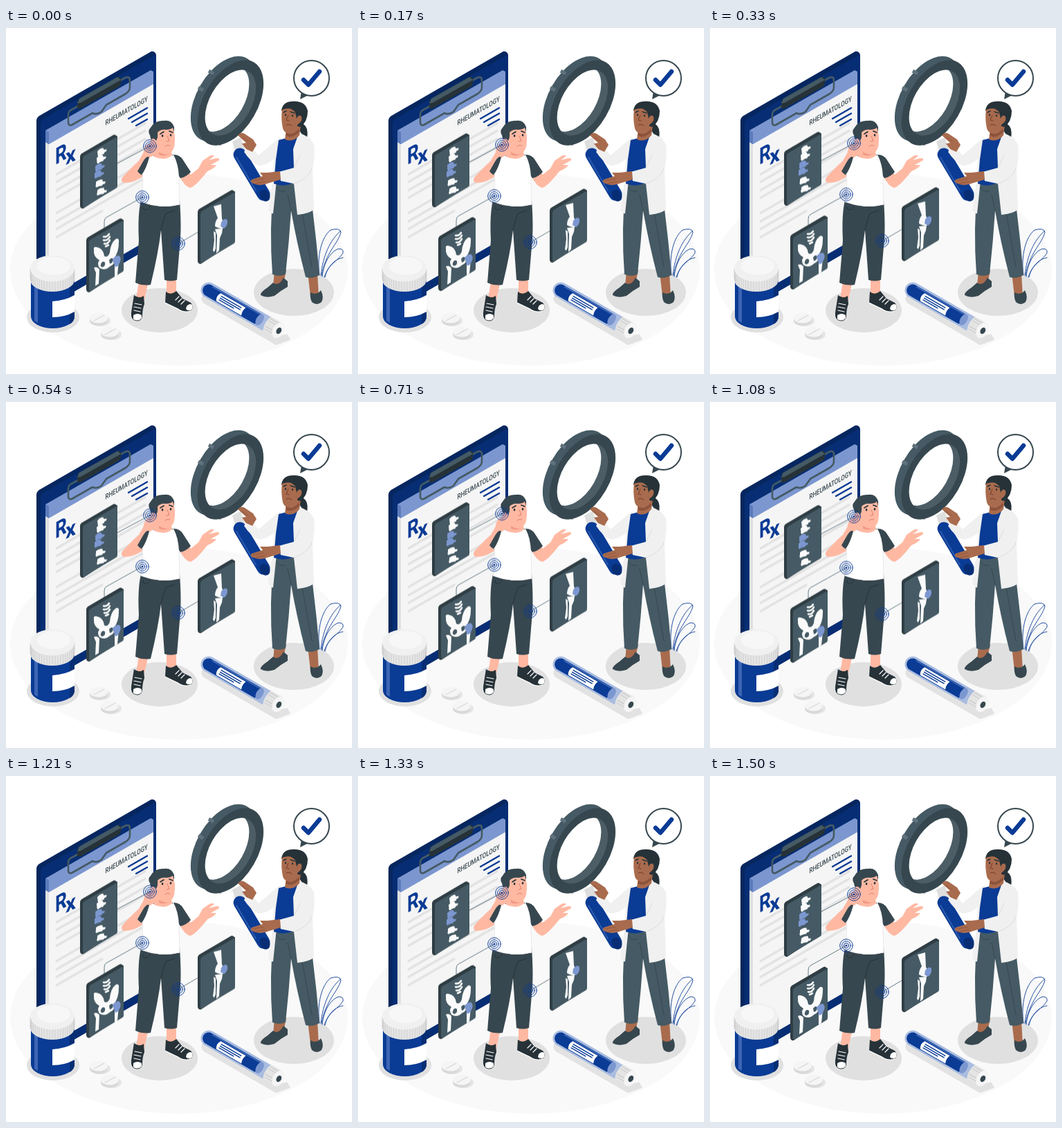
An HTML page for the animation above (1540 ms loop, 500 px wide and 500 px high).

```html
<!DOCTYPE html>
<html lang="en">
<head>
<meta charset="utf-8">
<title>Rheumatology</title>
<style>
  html, body { margin: 0; width: 100%; height: 100%; overflow: hidden; background: #fff; }
  svg { display: block; width: 100vw; height: 100vh; }
  .l { fill: none; stroke-linecap: round; stroke-linejoin: round; }
  .navy { fill: #0a3b95; } .board { fill: #072e74; } .deep { fill: #06265f; } .soft { fill: #7c97d0; }
  .slate { fill: #455a64; } .dark { fill: #37474f; } .ink { fill: #263238; }
  .skin { fill: #ffb9a3; } .tan { fill: #a96b4d; } .coat { fill: #f0f0f0; }
  text { font-family: Roboto, sans-serif; }
</style>
</head>
<body>
<svg viewBox="0 0 500 500">
  <defs>
    <g id="panel">
      <path fill="#2f3d44" d="M0 32Q0 30 2 28L48 1Q50 0 51 1L54 3V75L5 107Q3 108 1 106Q0 105 0 103Z"/>
      <path class="slate" d="M4 35Q4 33 6 31L51 5Q54 3 54 6V74Q54 77 52 78L7 105Q4 107 4 103Z"/>
    </g>
    <g id="target" class="l" stroke="#0b3a94">
      <circle r="9.3"/><circle r="6.3"/><circle r="3.6"/><circle r="1.6" fill="#0b3a94" stroke="none"/>
    </g>
    <path id="bone" d="M-5 -1Q-1 -5 4 -5L5 -2 9 -2 8 1 5 2 4 4Q0 4 -4 7Q-6 6 -5 3Z"/>
    <g id="pill">
      <ellipse cx="3" cy="4" rx="14" ry="8" fill="#e6e6e6"/>
      <path fill="#d9d9d9" d="M-13 0V4A13 7.500 0 0 0 13 4V0Z"/>
      <ellipse rx="13" ry="7.500" fill="#f5f5f5"/>
      <path class="l" stroke="#d0d0d0" d="M-7 4L8 -4"/>
    </g>
    <ellipse id="rim" rx="39" ry="67.500" transform="rotate(30)"/>
    <ellipse id="gap" rx="30" ry="52" transform="rotate(30)"/>
    <clipPath id="hole"><use href="#gap" x="324.400" y="108"/></clipPath>
  </defs>

  <ellipse cx="250" cy="349" rx="244" ry="139" fill="#f9f9f9"/>
  <ellipse cx="222" cy="408" rx="55" ry="32" fill="#e0e0e0"/>
  <ellipse cx="416" cy="382" rx="58" ry="34" fill="#e0e0e0"/>
  <ellipse cx="68" cy="418" rx="38" ry="22" fill="#e0e0e0"/>

  <!-- clipboard -->
  <path class="deep" d="M44 134Q44 130 48 127L208 35Q212 32 216 36L217 39V312L50 409Q44 411 44 404Z"/>
  <path class="board" d="M50 138Q50 134 54 131L213 40Q217 38 217 42V312L50 409Z"/>
  <path fill="#e0e0e0" d="M57 149L62 152V389L57 386Z"/>
  <path fill="#f5f5f5" d="M62 151L213 64V302L62 389Z"/>
  <path fill="#5c7bbd" d="M57 148L62 151V168L57 165Z"/>
  <path class="soft" d="M57 148L209 61 213 63V81L62 168V151Z"/>
  <g id="rows" class="l" stroke="#e3e3e3" stroke-width="3.600" style="stroke-linecap:butt"></g>
  <path class="l" stroke="#455a64" stroke-width="2.600" d="M104 113L93 119Q90 121 90 125V136Q90 143 97 139L125 123Q131 126 138 121L145 111 173 95Q179 91 179 86V76Q179 69 172 72L165 76"/>
  <path class="ink" d="M103 108Q103 104 106 102L161 71Q166 69 166 74V80Q166 83 163 85L108 116Q103 118 103 113Z"/>
  <path class="slate" d="M103 109L106 102 161 71 166 75 108 108Z"/>
  <text class="dark" font-weight="500" font-size="10.600" transform="matrix(.74 -.43 0 1 143.500 141)">RHEUMATOLOGY</text>
  <path class="l" stroke="#0b3a94" stroke-width="2.400" d="M177 131L204 115.500M182 136L204 123.500M188 141L204 132"/>
  <g class="navy" font-weight="700">
    <text font-size="33" transform="matrix(.8 -.46 0 1 71 198)">R</text>
    <text font-size="31" transform="matrix(.95 -.45 0 1 86 198)">x</text>
  </g>

  <!-- pill bottle and pills -->
  <path class="navy" d="M36 364H99V417A31.500 17 0 0 1 36 417Z"/>
  <path fill="#3c66b4" d="M41 372H46V426L41 423Z"/>
  <path class="board" d="M92 368H99V417Q99 424 92 428Z"/>
  <path fill="#fff" d="M67 395Q85 394 99 386V410Q85 418 67 418Z"/>
  <path fill="#e6e6e6" d="M35 347H99V364A32 17 0 0 1 35 364Z"/>
  <g id="ridges" class="l" stroke="#c9c9c9" stroke-width=".8"></g>
  <ellipse cx="67" cy="347.500" rx="32" ry="19" fill="#f0f0f0"/>
  <ellipse cx="69" cy="344" rx="24" ry="13" fill="#f7f7f7"/>
  <use href="#pill" x="134" y="419"/>
  <use href="#pill" x="150" y="439"/>

  <!-- vial, along its own axis -->
  <g transform="translate(293 379) rotate(30)">
    <path fill="#e2e2e2" d="M-3 7H120L130 -2 138 3 124 20H4Q-7 18 -3 7Z"/>
    <path fill="#a9bce0" d="M0 -11.500H100V11.500H0A11.500 11.500 0 0 1 0 -11.500Z"/>
    <path class="navy" d="M0 -8.500H82Q87 0 82 9H0A8.500 8.500 0 0 1 0 -8.500Z"/>
    <path fill="#3c66b4" d="M2 -8H84V-6H2Z"/>
    <ellipse cx="85" rx="5" ry="9" fill="#7c97d0"/>
    <path fill="#fff" d="M17 -5H59Q56 1 59 8H17Q13 1 17 -5Z"/>
    <path class="l" stroke="#0a3b95" stroke-width="1.400" d="M20 -1.500H53M20 1.500H53M20 4.500H44"/>
    <path fill="#e4e4e4" d="M97 -12H116V12H97Q92 0 97 -12Z"/>
    <path class="l" stroke="#c7c7c7" d="M98 -9H115M97 -5H115M97 4H115M98 8H115"/>
    <ellipse cx="116" rx="8" ry="12" fill="#f5f5f5"/>
    <ellipse cx="117" rx="3.500" ry="5" class="dark"/>
  </g>

  <!-- plant -->
  <g class="l" stroke="#2450a0">
    <path d="M453 357C449 330 456 302 469 292Q482 288 484 295C480 312 462 323 456 358M484 293C468 306 458 330 455 357"/>
    <path d="M457 359C459 338 470 322 481 319Q488 319 487 325C480 337 466 340 460 360"/>
    <path d="M461 360C464 345 476 333 487 332"/>
  </g>

  <!-- patient -->
  <path class="skin" d="M192 366H206L200 392H188ZM232 360H246V388H232Z"/>
  <path class="ink" d="M185 386Q192 392 199 387L200 399Q197 406 197 417Q195 425 187 423Q180 421 181 411Z"/>
  <path fill="#fff" d="M184 415Q190 411 196 415V419Q192 425 184 421Z"/>
  <path class="ink" d="M231 381Q238 387 246 380L255 391 267 397Q272 403 268 408Q258 413 248 405L230 397Z"/>
  <path fill="#fff" d="M261 402Q265 397 269 400Q271 405 267 408Q262 409 260 406Z"/>
  <path class="l" stroke="#fff" stroke-width="1.200" d="M186 398L196 400M185 403L195 405M185 408L194 410M245 393L250 388M249 396L254 391M253 399L258 394M230 397L248 406Q257 412 267 409"/>
  <path class="dark" d="M195 249H251Q254 290 251 316L247 364Q238 367 229 364L224 292Q220 326 209 371Q197 373 187 368L192 307Q190 270 195 249Z"/>
  <path class="l" stroke="#263238" d="M224 292Q227 278 231 268L243 264M197 258Q201 269 209 257"/>
  <path class="skin" d="M198 187Q185 197 168 216Q165 222 171 224Q187 224 204 210L208 190 217 184 214 171 204 172 197 183 186 202Z"/>
  <path class="dark" d="M214 184Q203 183 198 193L190 207Q195 214 203 214L218 190Z"/>
  <path class="skin" d="M251 215Q258 229 266 231Q274 229 291 207Q301 203 304 198L296 198 308 191Q309 188 304 188L293 191 301 185Q299 183 294 185L284 192 278 203 267 212 261 204Z"/>
  <path class="dark" d="M240 183Q251 182 256 191L267 208Q261 215 252 217L240 200Z"/>
  <path fill="#fff" d="M212 184Q227 193 242 183Q249 196 250 215L251 255Q224 262 195 251Q199 227 197 211Q203 202 207 187Z"/>
  <path class="l" stroke="#ebebeb" d="M250 216L251 255Q224 262 195 251Q199 227 197 211"/>
  <path class="skin" d="M212 166L214 186Q230 193 240 184L238 174Z"/>
  <path fill="#f29b86" d="M221 179Q230 185 238 178L238 181Q228 187 221 183Z"/>
  <path class="dark" d="M218 169Q209 164 208 155Q204 149 209 144Q215 133 228 134Q239 132 243 143L243 151 225 166Z"/>
  <path class="skin" d="M219 151Q224 146 231 147Q238 147 241 144Q246 156 243 172Q240 182 232 183Q222 181 217 173L213 171Q207 168 209 162Q213 157 217 163Q220 158 219 151Z"/>
  <path class="l" stroke="#263238" stroke-width="1.700" d="M223 153L228 150M236 149L241 151"/>
  <path class="ink" d="M226 154a1.300 1.800 0 1 0 .1 0ZM238 153a1.300 1.800 0 1 0 .1 0Z"/>
  <path class="l" stroke="#df7e6b" d="M233 156L236 163 232 164M230 171Q233 168 237 170"/>
  <path class="skin" d="M198 184Q199 171 206 167Q214 166 216 174Q216 184 208 187Z"/>

  <!-- magnifier: an extruded ring -->
  <use href="#rim" x="314.600" y="102.400" class="slate"/>
  <path class="slate" d="M329 41L339 46 310 170 300 165Z"/>
  <path class="l" stroke="#60737c" stroke-width="5" style="stroke-linecap:butt" d="M278 86L285 90M293 62L300 66"/>
  <use href="#rim" x="324.400" y="108" class="dark"/>
  <g clip-path="url(#hole)">
    <path fill="#4c5d66" d="M270 40H375V175H270Z"/>
    <use href="#gap" x="314.600" y="102.400" fill="#fff"/>
  </g>
  <path fill="#dedede" d="M327 164L339 158 346 176 332 181Z"/>
  <path class="l" stroke="#0a3b95" stroke-width="19" d="M338 183L372 240"/>
  <path class="l" stroke="#2d5bad" stroke-width="2" d="M333 187L361 235"/>
  <ellipse cx="374" cy="242" rx="7" ry="9" class="board" transform="rotate(-30 374 242)"/>

  <!-- doctor -->
  <path class="tan" d="M388 350H405L400 374H386ZM436 354H450L452 388H440Z"/>
  <path class="dark" d="M386 368Q394 374 401 361L407 366V374Q396 380 388 387Q376 391 368 386Q367 382 378 375ZM440 382Q449 387 455 379Q460 389 456 396Q449 402 442 396Q439 390 440 382Z"/>
  <path class="slate" d="M387 222H419L443 262Q449 310 453 357Q443 363 433 360Q420 310 412 264Q409 310 404 356Q394 360 385 356Q380 290 387 222Z"/>
  <path class="l" stroke="#37474f" d="M412 264L407 241M390 230Q394 238 403 236M427 262L442 345"/>
  <path class="ink" d="M426 137Q438 141 435 159Q429 157 424 148Z"/>
  <path class="coat" d="M396 158L387 165Q376 175 365 184L351 169 344 179Q354 194 365 199Q378 198 387 189L386 215 379 263Q383 269 386 268L391 220 399 160Z"/>
  <path class="navy" d="M394 162L421 155 419 222Q404 231 387 225L390 190Z"/>
  <path class="coat" d="M423 152Q438 155 445 168Q447 186 443 204L445 262Q439 268 421 270L416 225 397 221 394 208 416 202 415 175Z"/>
  <path class="l" stroke="#dcdcdc" d="M416 202L425 184M416 225Q436 219 442 203"/>
  <path class="tan" d="M405 145L403 161Q415 166 424 155L426 141Z"/>
  <path fill="#8c523b" d="M405 151Q413 157 423 146L424 150Q414 160 405 156Z"/>
  <path class="ink" d="M398 119Q400 106 415 106Q433 105 436 120Q436 136 425 143L414 140Z"/>
  <path class="tan" d="M399 118Q412 113 418 122L420 131Q423 124 427 128Q429 135 422 139Q417 149 409 152Q402 152 400 145Q397 130 399 118Z"/>
  <path class="l" stroke="#263238" stroke-width="1.500" d="M401 122L405 120M411 121L417 123"/>
  <path class="ink" d="M404 124a1.100 1.600 0 1 0 .1 0ZM414 125a1.100 1.600 0 1 0 .1 0Z"/>
  <path class="l" stroke="#753d2b" d="M408 126L405 133 409 134M405 140Q409 138 413 141"/>
  <path class="tan" d="M335 155Q340 149 345 153L357 161 362 169 356 179 347 175 341 167 347 166Z"/>
  <path class="tan" d="M396 207L378 209 367 209 371 214 355 219Q352 222 356 224Q366 230 380 224L397 219Z"/>
  <path class="l" stroke="#8c523b" stroke-width=".8" d="M357 221L372 218M360 225L374 222M341 158L350 164"/>

  <!-- speech bubble -->
  <path class="dark" d="M427 91L425 103 437 97Z"/>
  <circle cx="441.500" cy="72.500" r="25.500" fill="#fff" stroke="#37474f" stroke-width="2"/>
  <path class="l" stroke="#0a3b95" stroke-width="6.500" d="M430 75L437 82 453 63"/>

  <!-- floating scans -->
  <g id="float">
    <path class="l" stroke="#546e7a" stroke-width=".9" d="M161 196L208 171M142 292V280Q142 276 145 274L197 245M249 312L278 295"/>
    <use href="#panel" x="107" y="154"/>
    <use href="#panel" x="116" y="275"/>
    <use href="#panel" x="277" y="234"/>
    <g id="spine" fill="#fafafa"></g>
    <g fill="#fafafa">
      <path class="l" style="stroke:#fafafa" stroke-width="2.600" d="M141 302Q146 303 149 298M141 307Q147 308 150 302M142 312Q147 313 150 307M144 316L148 314"/>
      <path fill-rule="evenodd" d="M127 321Q126 316 131 317Q141 319 142 330Q147 333 150 325Q151 311 159 305Q164 304 163 310Q163 325 156 333Q158 342 150 345Q143 352 135 347Q131 341 135 336Q126 331 127 321ZM137 342Q139 336 143 339Q144 345 139 346Q136 345 137 342ZM149 336Q152 331 155 334Q155 340 150 341Z"/>
      <path d="M127 347Q131 344 135 349L134 370 129 373 130 354ZM157 341L163 337 161 357 157 360Z"/>
      <path class="soft" d="M154 335Q156 330 163 329Q167 332 165 338L162 344 158 346Z"/>
      <path d="M300 258L311 255 312 276 317 286Q315 292 306 289L302 287Q302 280 306 275Z"/>
      <path d="M302 291L313 290 312 297 309 304 308 322 304 326 305 300ZM300 294L303 296 303 319 301 324 299 322 301 307Z"/>
      <path class="soft" d="M311 281Q316 274 320 278Q321 286 315 290L310 287Z"/>
    </g>
    <use href="#target" x="208" y="171"/>
    <use href="#target" x="197" y="245"/>
    <use href="#target" x="249" y="312"/>
  </g>
</svg>
<script>
  const NS = "http://www.w3.org/2000/svg";
  const byId = id => document.getElementById(id);
  const add = (parent, tag, attrs) => {
    const el = parent.appendChild(document.createElementNS(NS, tag));
    for (const key in attrs) el.setAttribute(key, attrs[key]);
  };

  for (const y of [212, 223, 235, 246, 268, 280, 291, 303]) {
    const w = y > 300 ? 68 : 130;
    add(byId("rows"), "path", { d: `M72 ${y}l${w} ${-w * 0.577}` });
  }

  for (let i = 0; i < 25; i++) {
    const a = Math.PI * (i + 0.5) / 25;
    const x = 67 + 32 * Math.cos(a);
    const y = 347 + 18 * Math.sin(a);
    add(byId("ridges"), "path", { d: `M${x} ${y}V${y + 15}` });
  }

  const spine = [[137, 179], [136, 189], [134, 201], [133, 211], [135, 224], [137, 236]];
  spine.forEach(([x, y], i) => add(byId("spine"), "use", {
    href: "#bone",
    class: i === 2 || i === 3 ? "soft" : "",
    transform: `translate(${x} ${y}) rotate(${i * 3 - 10})`
  }));

  const LOOP = 1540;
  const steps = [[0, 0], [740, -10], [1500, 0], [LOOP, 0]];
  const anim = byId("float").animate(
    steps.map(([t, y]) => ({ offset: t / LOOP, transform: `translateY(${y}px)` })),
    { duration: LOOP, iterations: Infinity }
  );
  anim.startTime = document.timeline.currentTime;
</script>
</body>
</html>
```
